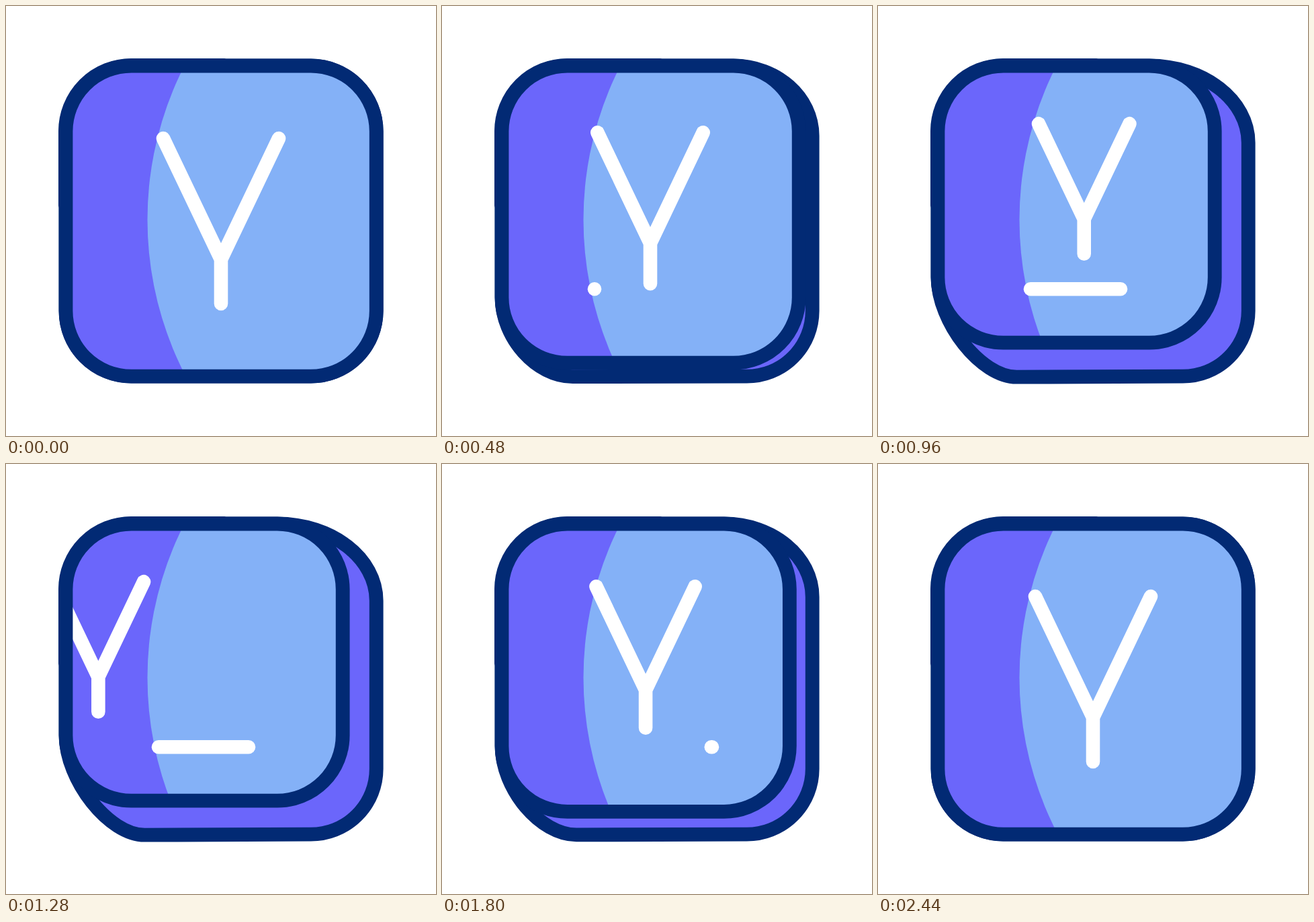
These frames come from a looping animation (640x640 px, 2480 ms). An HTML page:

```html
<!DOCTYPE html>
<html lang="en">
<head>
<meta charset="utf-8">
<title>Key press</title>
<style>
  html, body { margin: 0; width: 100%; height: 100%; overflow: hidden; background: #fff; }
  svg { display: block; width: 100vw; height: 100vh; }
  .edge { stroke: #022a74; stroke-width: 20.8; stroke-linejoin: round; }
  .ink { fill: none; stroke: #fff; stroke-width: 20.6; stroke-linecap: round; stroke-linejoin: round; }
</style>
</head>
<body>
<svg viewBox="0 0 640 640">
  <defs>
    <clipPath id="top"><rect class="face" x="89" y="89" rx="97.5"/></clipPath>
  </defs>
  <path id="body" class="edge" fill="#6b66fb"/>
  <g clip-path="url(#top)">
    <rect width="640" height="640" fill="#6b66fb"/>
    <circle cx="715.5" cy="318" r="505" fill="#84b1f7"/>
    <path id="letterA" class="ink"/>
    <path id="letterB" class="ink"/>
    <path id="bar" class="ink"/>
  </g>
  <rect class="face edge" x="89" y="89" rx="97.5" fill="none"/>
</svg>
<script>
  const LOOP = 2480, SIZE = 462.2, DEPTH = 50, TRAVEL = 464;
  const $ = id => document.getElementById(id);
  const faces = document.querySelectorAll('.face');

  const span = (t, from, to) => Math.min(1, Math.max(0, (t - from) / (to - from)));
  const mix = (a, b, k) => a + (b - a) * k;
  const inOut = u => u < .5 ? 4 * u ** 3 : 1 - 4 * (1 - u) ** 3;

  // Symmetric ease that pulls back before it leaves and overshoots on arrival
  function inOutBack(u) {
    const c = 1.4;
    const half = v => v * v * ((c + 1) * v - c) / 2;
    return u < .5 ? half(2 * u) : 1 - half(2 - 2 * u);
  }

  function bodyPath(p) {
    const rx = 551.2, by = 551.2 + p;
    const x0 = 453.7 - DEPTH * p, y1 = 186.5 + 17 * p;
    const x2 = 186.5 + 20 * p, y3 = 453.7 - DEPTH * p;
    const k = .552, q = .552 - .1 * p;
    return `M88.4 297V186.5A98 98 0 0 1 186.5 88.4H325V89H${x0}` +
      `C${mix(x0, rx, k)} 89 ${rx} ${mix(y1, 89, k)} ${rx} ${y1}` +
      `V453.7A97.5 97.5 0 0 1 453.7 551.2L${x2} ${by}` +
      `C${mix(x2, 89, q)} ${by} 89 ${mix(y3, by, q)} 89 ${y3}V297Z`;
  }

  function letterPath(p, shift) {
    const s = 1 - .213 * p;
    const cx = 320 - 25 * p + shift, cy = 320 - 48 * p;
    const at = (x, y) => `${cx + x * s} ${cy + y * s}`;
    return `M${at(-86, -123)}L${at(0, 57)}L${at(86, -123)}M${at(0, 57)}L${at(0, 123)}`;
  }

  function draw(t) {
    const p = inOut(span(t, 105, 915)) - inOut(span(t, 1451, 2261));
    for (const f of faces) {
      f.setAttribute('width', SIZE - DEPTH * p);
      f.setAttribute('height', SIZE - DEPTH * p);
    }
    $('body').setAttribute('d', bodyPath(p));

    const slide = -TRAVEL * inOutBack(span(t, 840, 1800));
    $('letterA').setAttribute('d', letterPath(p, slide));
    $('letterB').setAttribute('d', letterPath(p, slide + TRAVEL));

    const grow = inOut(span(t, 480, 834));
    const leave = inOut(span(t, 1400, 1830));
    const start = mix(227, 401, leave);
    const end = mix(mix(227, 361, grow), 402, leave);
    $('bar').setAttribute('d', `M${start} 421.3H${end}`);
    $('bar').style.display = t > 480 && t < 1830 ? '' : 'none';
  }

  function tick() {
    draw(performance.now() % LOOP);
    requestAnimationFrame(tick);
  }
  tick();
</script>
</body>
</html>
```
